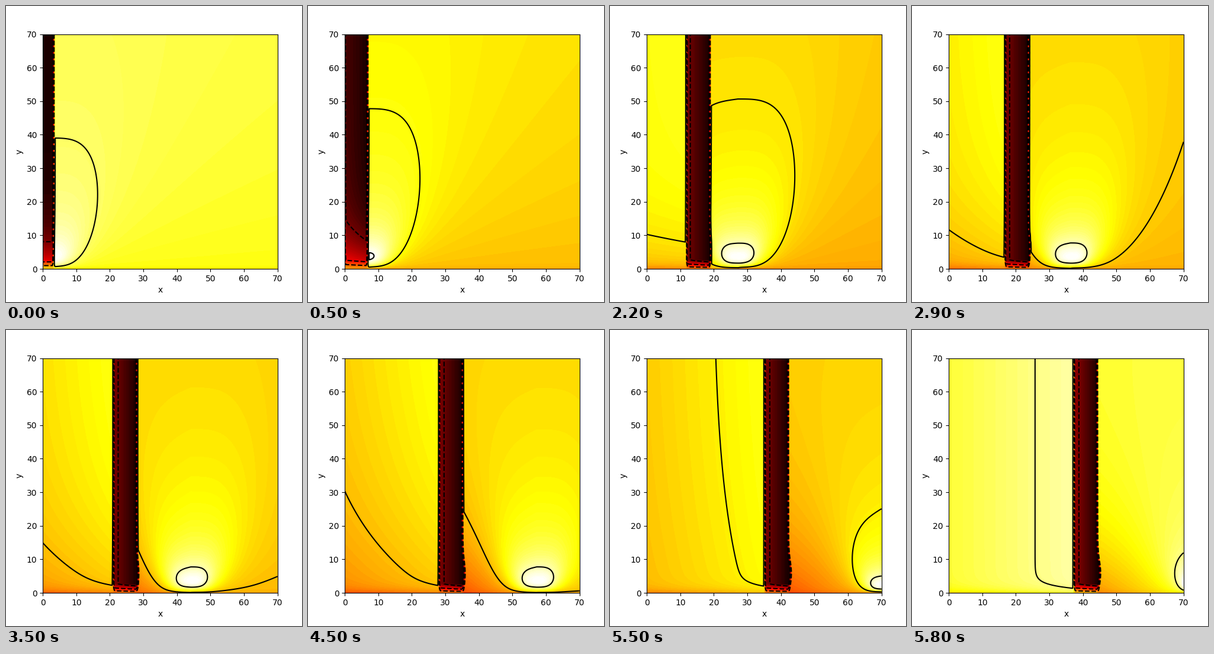
Animation of 500 by 500 pixels, one loop 5.9 s. Source, as a matplotlib script:

```python
import numpy as np
import matplotlib.pyplot as plt
from matplotlib.animation import FuncAnimation

FRAMES, SPAN, N = 59, 70, 397
STEP = SPAN / 99      # the band moves one cell per frame
WIDTH = 7
REST = .66            # undisturbed value

axis = np.linspace(0, SPAN, N)
X, Y = np.meshgrid(axis, axis)


def ramp(v, start, end):
    return np.clip((v - start) / (end - start), 0, 1)


def plume(dx, s):
    """Dipole-like bump above the ground, with its peak of 1 at height s."""
    spread = .19 * np.abs(dx) ** 1.7
    return 2 * s * Y / (spread ** 2 + Y ** 2 + s ** 2)


def ahead(n, right):
    early, late = np.exp(-n / 5), ramp(n, 50, 58)
    px = 14 + 1.31 * (n - 12) + 4 * early
    dx = X - px
    bump = .34 * (1 - .55 * early) * plume(dx, 3.6 * (1 - .55 * late))
    fan = .09 * np.exp(-abs(n - 12) / 15) * (dx > 0)
    fan = fan * np.exp(-1.7 * Y / np.maximum(dx, .01))
    wake = .17 * ramp(n, 20, 40) * np.exp(-Y / 18)
    wake = wake * np.clip(-dx / max(px - right, 1), 0, 1)
    return REST + bump - fan - wake - .03 * np.exp(-Y / .5)


def behind(n, left):
    far = .655 + .18 * np.exp((12 - n) / 18)
    near = max(.765, far + .01)
    u = np.clip(X / max(left, 1), 0, 1)
    sink = .11 * ramp(n, 58, 45) * np.exp(-Y / max(.6 * n, 1))
    return far + (near - far) * u - sink - .09 * np.exp(-Y / 1.2)


def band(n, left):
    v = np.clip((X - left) / WIDTH, 0, 1)
    core = .02 + .15 * (1 - np.exp(-n / 8)) * (1 - v)
    core = core + .33 * ramp(n, 22, 12) * np.exp(-Y / 8)
    return .55 + (core - .55) * ramp(Y, 0, 2.6)


def field(n):
    right = 3.4 + STEP * n
    left = right - WIDTH
    bulge = .8 * n / FRAMES * np.exp(-((Y - 6) / 5) ** 2)
    mask = (np.clip((X - left + .4) / STEP, 0, 1)
            * np.clip((right + .2 + bulge - X) / STEP, 0, 1))
    outside = np.where(X < left + WIDTH / 2, behind(n, left), ahead(n, right))
    return outside + (band(n, left) - outside) * mask


def main_level(n):
    level = np.interp(n, [22, 32, 45, 50, 58], [.708, .652, .648, .703, .735])
    return level - .02 * np.exp(-n / 5)


fig = plt.figure(figsize=(5, 5), dpi=100)
ax = fig.add_axes([.1244, .112, .7928, .7928])
image = ax.imshow(np.zeros((N, N)), cmap="hot", vmin=0, vmax=1,
                  origin="lower", extent=(0, SPAN, 0, SPAN),
                  aspect="auto", interpolation="nearest")
ax.set(xlim=(0, SPAN), ylim=(0, SPAN), xlabel="x", ylabel="y",
       xticks=range(0, 71, 10), yticks=range(0, 71, 10))


def draw(n):
    z = field(n)
    shade = np.floor(np.clip(z / z.max(), 0, .999) * 100) + .5
    image.set_data(shade / 100)
    for old in list(ax.collections):
        old.remove()
    ax.contour(X, Y, z, levels=[.14, .33, .46, main_level(n), .92],
               colors="k", linewidths=1.5,
               linestyles=["--"] * 3 + ["-"] * 2)
    return [image, *ax.collections]


anim = FuncAnimation(fig, draw, frames=FRAMES, interval=100,
                     repeat=True, repeat_delay=0, blit=False)
plt.show()
```
